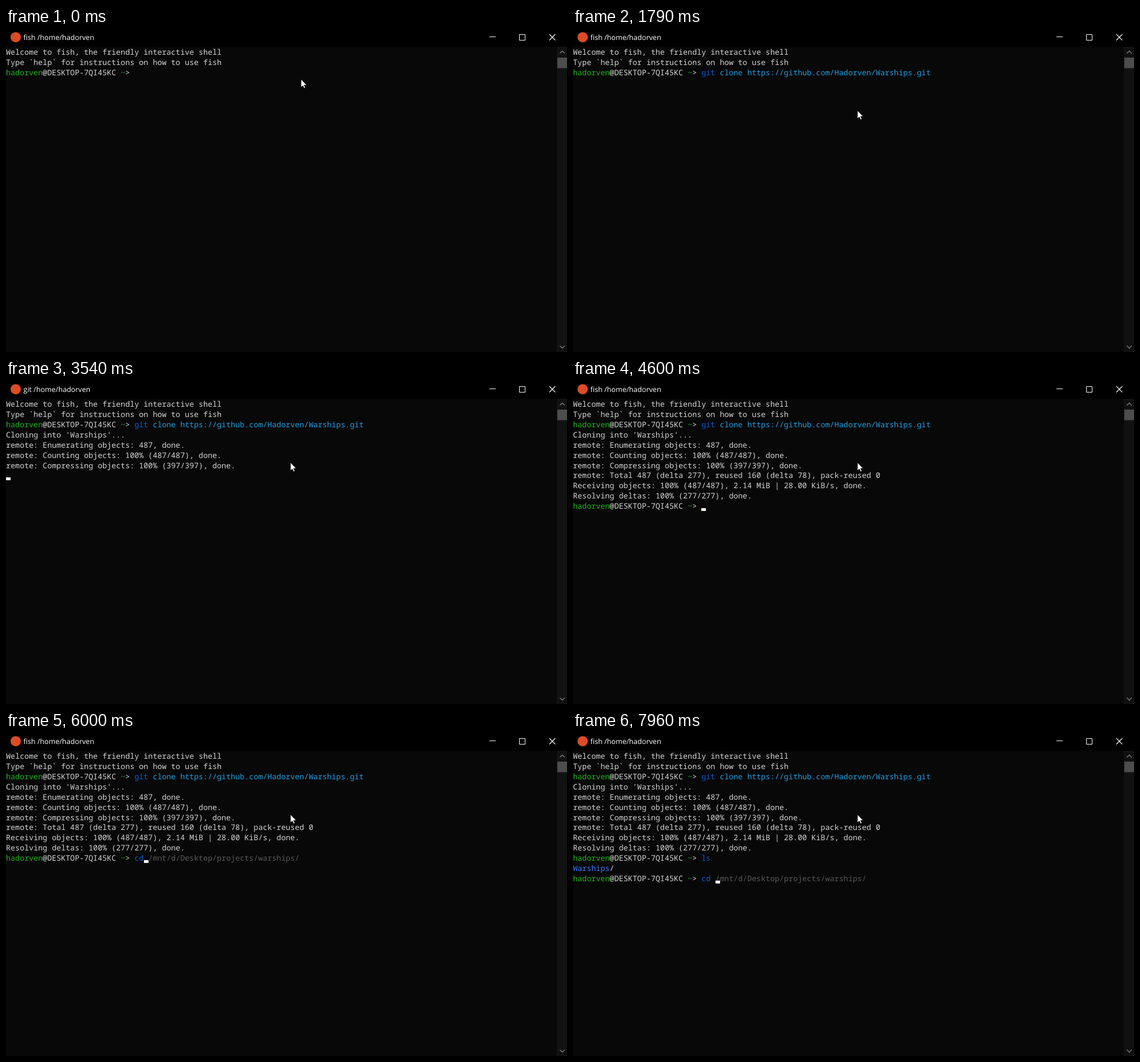
Recreate the animation shown at these times as an HTML page. Size 984 by 569 pixels, loop 7990 ms.

```html
<!DOCTYPE html>
<html lang="en">
<head>
<meta charset="utf-8">
<title>Terminal</title>
<style>
  html, body { margin: 0; width: 100%; height: 100%; overflow: hidden; background: #080808; }
  #stage { position: relative; width: 984px; height: 569px; overflow: hidden; background: #080808; }
  #bar { position: absolute; left: 0; top: 0; width: 984px; height: 33px; background: #000; }
  #title {
    position: absolute; left: 30.5px; top: 0; white-space: pre; color: #fff;
    font: 12.6px/33px "Open Sans", "Noto Sans", sans-serif; text-rendering: geometricPrecision;
  }
  #screen {
    position: absolute; left: 0; top: 34px; margin: 0; color: #d4d4d4; white-space: pre;
    font: 13.417px/17.93px "Noto Sans Mono", "DejaVu Sans Mono", monospace;
    text-rendering: geometricPrecision; font-variant-ligatures: none;
  }
  #screen div { height: 17.93px; }
  .user { color: #1eb41a; }
  .cwd { color: #1c9c30; }
  .cmd { color: #0c5cc8; }
  .arg { color: #1f9fe2; }
  .hint { color: #585858; }
  .dir { color: #3b78ff; }
  #caret { position: absolute; left: 0; top: 0; width: 8px; height: 5px; background: #fff; }
  svg { position: absolute; left: 0; top: 0; }
</style>
</head>
<body>
<div id="stage">
  <div id="bar"></div>
  <div id="title"></div>
  <div id="screen"></div>
  <div id="caret"></div>
  <svg width="984" height="569" viewBox="0 0 984 569" fill="none">
    <circle cx="17" cy="16.2" r="9" fill="#dd4b26"/>
    <g stroke="#fff">
      <path d="M848 15.5h11M900.5 11.5h10v10h-10z"/>
      <path d="M953 11l10.5 10.5M963.5 11L953 21.5" stroke-width="1.1"/>
    </g>
    <rect x="966" y="33" width="18" height="536" fill="#111"/>
    <rect x="967" y="52" width="17" height="18.5" fill="#4d4d4d"/>
    <path d="M971.5 44.5l4.2-4.2 4.2 4.2M971.5 558l4.2 4.2 4.2-4.2" stroke="#777" stroke-width="1.5"/>
    <path id="mouse" d="M0 0V14.2L3.2 11.2 5.4 16 7.6 15 5.4 10.3H9.9Z" fill="#fff" stroke="#000" stroke-width=".7"/>
  </svg>
</div>
<script>
const LOOP = 7990, COL = 8.05, ROW = 17.93, TOP = 33;
const USER = 'hadorven';
const HINT = 'cd /mnt/d/Desktop/projects/warships/';

const PASTE = 700, ENTER = 1950, REMOTE = 3170, RECEIVE = 3980, DONE = 4450, LIST = 7340;
const CARET_OFF = [[0, PASTE], [1310, 1840], [2900, REMOTE], [5020, 5550]];

// [time, text typed so far]
const FIRST = [[5720, 'c'], [5880, 'cd'], [6500, 'c'], [6620, ''], [6860, 'l'], [7010, 'ls']];
const SECOND = [[7600, 'c'], [7730, 'cd'], [7880, 'cd ']];

const el = id => document.getElementById(id);
const span = (cls, text) => `<span class="${cls}">${text}</span>`;
const clamp = x => Math.max(0, Math.min(1, x));
const prompt = span('user', USER) + '@DESKTOP-7QI45KC ' + span('cwd', '~') + '&gt; ';
const PROMPT_LEN = USER.length + 20;
const clone = span('cmd', 'git') +
  span('arg', ' clone https://github.com/Hadorven/Warships.git');

function typed(steps, t) {
  let text = '';
  for (const [at, s] of steps) if (t >= at) text = s;
  return text;
}

function input(text) {
  const hint = text[0] === 'c' ? HINT.slice(text.length) : '';
  return prompt + span('cmd', text) + span('hint', hint);
}

function progress(label, total, from, to, t, tail = '') {
  const p = clamp((t - from) / (to - from));
  const pct = String(Math.floor(p * 100)).padStart(3);
  return `${label}: ${pct}% (${Math.floor(p * total)}/${total})` + (p === 1 ? tail + ', done.' : '');
}

// Returns the lines on screen and the caret cell.
function terminal(t) {
  const lines = ['Welcome to fish, the friendly interactive shell',
    'Type `help` for instructions on how to use fish'];
  lines.push(prompt + (t >= PASTE ? clone : ''));
  if (t < ENTER) return { lines, col: t < PASTE ? PROMPT_LEN : PROMPT_LEN + 50, row: 2 };

  lines.push("Cloning into 'Warships'...");
  if (t < REMOTE) return { lines, col: 0, row: 4 };

  lines.push('remote: Enumerating objects: 487, done.');
  lines.push(progress('remote: Counting objects', 487, REMOTE, 3290, t));
  if (t < 3290) return { lines, col: 0, row: 5 };
  lines.push(progress('remote: Compressing objects', 397, 3290, 3500, t));
  if (t < RECEIVE) return { lines, col: 0, row: t < 3500 ? 6 : 7 };

  lines.push('remote: Total 487 (delta 277), reused 160 (delta 78), pack-reused 0');
  lines.push(progress('Receiving objects', 487, RECEIVE, 4300, t, ', 2.14 MiB | 28.00 KiB/s'));
  if (t < 4300) return { lines, col: 0, row: 8 };
  lines.push(progress('Resolving deltas', 277, 4300, 4420, t));
  if (t < DONE) return { lines, col: 0, row: t < 4420 ? 9 : 10 };

  const first = typed(FIRST, t);
  lines.push(t < LIST ? input(first) : prompt + span('cmd', 'ls'));
  if (t < LIST) return { lines, col: PROMPT_LEN + first.length, row: 10 };

  const second = typed(SECOND, t);
  lines.push(span('dir', 'Warships') + '/', input(second));
  return { lines, col: PROMPT_LEN + second.length, row: 12 };
}

let shown = '';
function draw(t) {
  const { lines, col, row } = terminal(t);
  const html = lines.map(l => `<div>${l}</div>`).join('');
  if (html !== shown) el('screen').innerHTML = shown = html;

  el('title').textContent = (t >= ENTER && t < DONE ? 'git' : 'fish') + ' /home/' + USER;

  const caret = el('caret').style;
  const x = Math.round(col * COL), y = Math.round(TOP + (row + 1) * ROW - 5);
  caret.transform = `translate(${x}px, ${y}px)`;
  caret.visibility = CARET_OFF.some(([a, b]) => t >= a && t < b) ? 'hidden' : 'visible';

  const p = clamp((t - 40) / 520), e = p * p * (3 - 2 * p);
  el('mouse').setAttribute('transform', `translate(${517.5 - 18.5 * e} ${90 + 55 * e})`);
}

const start = performance.now();
function tick() {
  draw((performance.now() - start) % LOOP);
  requestAnimationFrame(tick);
}
tick();
</script>
</body>
</html>
```
